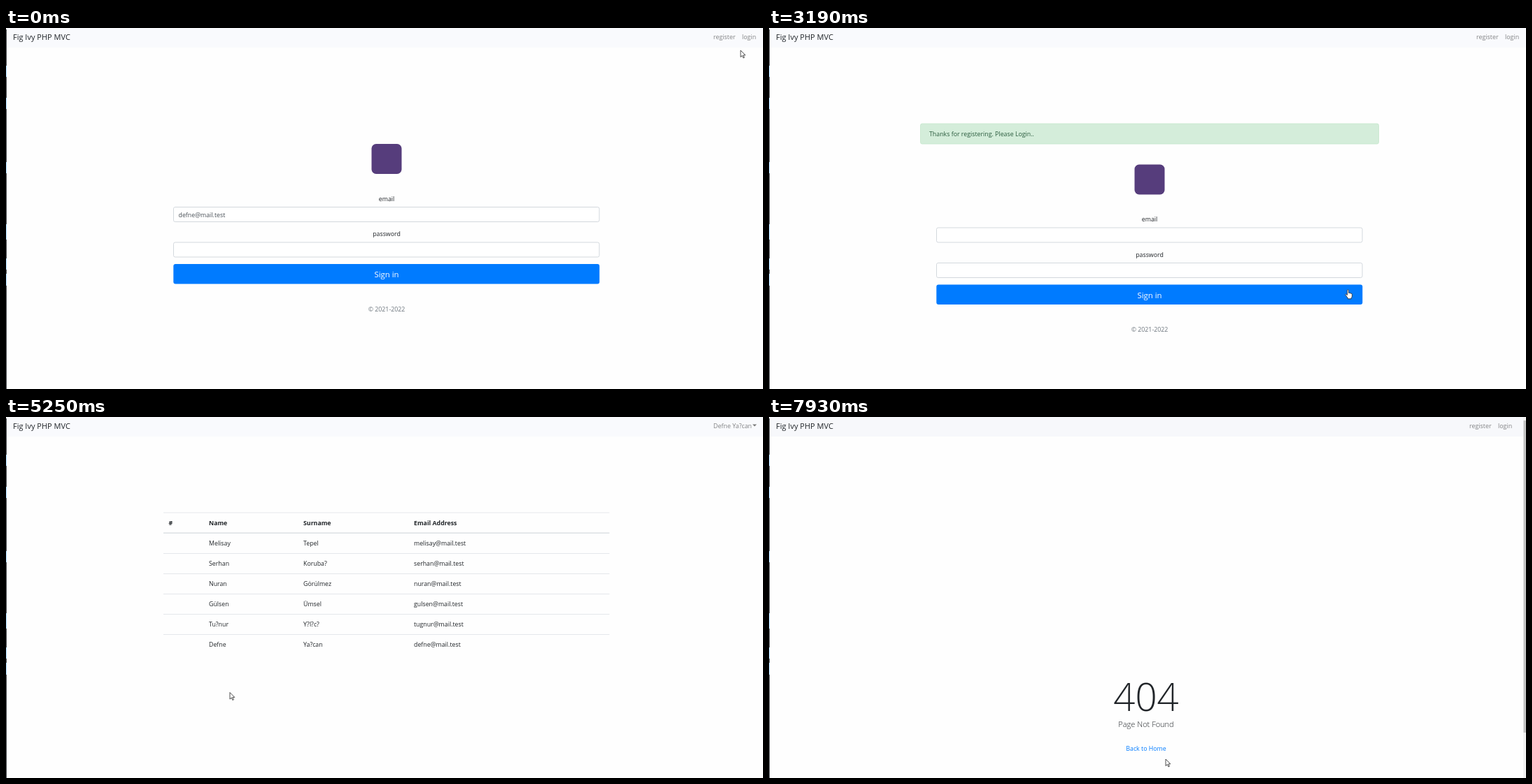
An HTML page for the animation above (8 s loop, 1082x517 px).

```html
<!DOCTYPE html>
<html lang="en">
<head>
<meta charset="utf-8">
<title>Registration walkthrough</title>
<style>
  html, body { margin: 0; width: 100%; height: 100%; overflow: hidden; background: #fefefe; }
  svg { display: block; width: 1082px; height: 517px; font-family: "Open Sans", "Noto Sans", sans-serif; }
</style>
</head>
<body>
<svg id="stage" viewBox="0 0 1082 517"></svg>
<script>
const LOOP = 8000;
const stage = document.getElementById('stage');
const INK = '#212529', FIELD_INK = '#495057', BLUE = '#007bff', BLUE_HOVER = '#0069d9';
const FIRST = 'Defne', LAST = 'Yağcan', EMAIL = 'defne@mail.test';

const PEOPLE = [
  ['Melisay', 'Tepel', 'melisay'],
  ['Serhan', 'Koruba?', 'serhan'],
  ['Nuran', 'Görülmez', 'nuran'],
  ['Gülsen', 'Ümsel', 'gulsen'],
  ['Tu?nur', 'Y?l?c?', 'tugnur'],
  [FIRST, 'Ya?can', 'defne']
];

// Pointer path: time, x, y and shape from that time on
const PATH = [
  [0, 1050, 32, 'arrow'], [80, 1050, 32, 'arrow'], [320, 1027, 11, 'hand'],
  [560, 1027, 11, 'arrow'], [860, 266, 181, 'beam'], [940, 261, 183, 'beam'],
  [2060, 261, 183, 'beam'], [2140, 330, 220, 'arrow'], [2305, 634, 367, 'arrow'],
  [2380, 634, 367, 'arrow'], [2550, 830, 373, 'hand'], [2870, 830, 373, 'hand'],
  [3420, 826, 376, 'arrow'], [3560, 690, 434, 'arrow'], [3740, 310, 298, 'beam'],
  [3880, 310, 298, 'arrow'], [3960, 301, 313, 'arrow'], [4050, 301, 313, 'arrow'],
  [4180, 300, 319, 'arrow'], [4300, 300, 319, 'arrow'], [4480, 312, 347, 'beam'],
  [4720, 312, 347, 'beam'], [4950, 320, 394.5, 'hand'], [5180, 320, 394.5, 'arrow'],
  [5330, 320, 394.5, 'arrow'], [5720, 1036, 12, 'hand'], [6030, 1036, 12, 'hand'],
  [6500, 1037, 42, 'hand'], [6740, 1037, 42, 'arrow'], [7400, 480, -16, 'arrow'],
  [7720, 535, -16, 'arrow'], [7850, 553, 362, 'arrow'], [7925, 567, 490, 'arrow']
];

const rect = (x, y, w, h, fill, extra = '') =>
  `<rect x="${x}" y="${y}" width="${w}" height="${h}" fill="${fill}" ${extra}/>`;

const text = (x, y, value, { size = 8.8, fill = INK, anchor = 'start', weight = 400 } = {}) =>
  `<text x="${x}" y="${y}" font-size="${size}" fill="${fill}" text-anchor="${anchor}" font-weight="${weight}">${value}</text>`;

const typed = (value, t, start, end) =>
  value.slice(0, Math.max(0, Math.floor((t - start) / (end - start) * value.length)));

function input(x, y, w, value = '', focused = false) {
  const ring = focused
    ? rect(x - .8, y - .8, w + 1.6, 23.6, 'none', 'rx="3" stroke="#bfdeff" stroke-width="2.4"') : '';
  const box = rect(x + .5, y + .5, w - 1, 21, '#fff',
    `rx="2.3" stroke="${focused ? '#80bdff' : '#ced4da'}" stroke-width=".9"`);
  const content = value === '•'
    ? `<circle cx="${x + 9.5}" cy="${y + 12}" r="1.2" fill="${FIELD_INK}"/>`
    : text(x + 7.5, y + 15, value, { fill: FIELD_INK });
  return ring + box + content;
}

function suggestions(x, y, h, items) {
  return rect(x - .5, y + 1, 114.5, h + .5, '#000', 'opacity=".16" rx="1.5"') +
    rect(x, y, 113, h, '#fff', 'rx="1" stroke="#d5d5d5" stroke-width=".6"') +
    items.map((item, i) => text(x + 7.3, y + 17.7 + i * 21.2, item, { size: 7.3, weight: 500 })).join('');
}

function leftEdge() {
  const lit = [[54, 70], [100, 116], [192, 208], [281, 303], [330, 346], [352, 369]];
  return rect(0, 2, 1, 515, '#45474b') +
    lit.map(([a, b]) => rect(0, a, 1, b - a, '#a9d8fb')).join('');
}

function navbar(t, { user = false, shift = 0, fill = '#f9fafd' } = {}) {
  const link = (x, label, hover) =>
    text(x - shift, 15.5, label, { size: 8.9, fill: hover ? '#4d4d4e' : '#828385' });
  const links = user
    ? link(1011, FIRST + ' Ya?can', t > 5720 && t < 6200) + '<path d="M1067 10.5h6l-3 3z" fill="#777"/>'
    : link(1011, 'register', t > 320 && t < 600) + link(1052, 'login');
  return rect(0, 0, 1082, 28, fill) + text(10, 16.5, 'Fig Ivy PHP MVC', { size: 11 }) + links;
}

function loginPage(dy, { email = '', password = '', focus = '', hover = false } = {}) {
  const middle = { anchor: 'middle' };
  return `<g transform="translate(0 ${dy})">` +
    rect(522.5, 166, 43, 43, '#563d7c', 'rx="6.5"') +
    text(544, 247.5, 'email', middle) + input(239, 256, 609.5, email, focus === 'email') +
    text(544, 298, 'password', middle) + input(239, 306.5, 609.5, password, focus === 'password') +
    rect(239.3, 338, 609, 28.5, hover ? BLUE_HOVER : BLUE, 'rx="3"') +
    text(544, 357, 'Sign in', { ...middle, size: 11.4, fill: '#fff' }) +
    text(544, 405.5, '© 2021-2022', { ...middle, fill: '#6c757d' }) + '</g>';
}

function registerPage(t) {
  const focus = t < 940 ? '' : t < 1340 ? 'first' : t < 1740 ? 'last'
    : t < 2060 ? 'email' : t < 2180 ? 'password' : 'confirm';
  const hover = t > 2540;
  const field = (name, label, x, y, w, value) =>
    text(x, y - 8.7, label) + input(x - .5, y, w, value, focus === name);
  return field('first', 'First Name', 231, 170, 310.5, typed(FIRST, t, 1010, 1310)) +
    field('last', 'Last Name', 547, 170, 310.5, typed(LAST, t, 1360, 1700)) +
    field('email', 'Email Address', 231, 230.3, 626.5, typed(EMAIL, t, 1750, 2040)) +
    field('password', 'Password', 231, 281, 626.5, t > 2120 ? '•' : '') +
    field('confirm', 'Confirm Password', 231, 331.7, 626.5, t > 2250 ? '•' : '') +
    rect(808, 363.3, 49.3, 22.4, hover ? BLUE_HOVER : BLUE, 'rx="2.4"') +
    text(832.6, 377.8, 'Register', { anchor: 'middle', fill: '#fff' }) +
    (t >= 940 && t < 1070 ? suggestions(231, 194, 94, ['Serhan', 'Nuran', 'Gülsen', 'Tuğnur']) : '');
}

function welcomeLogin(t) {
  const email = t < 4260 ? typed(EMAIL.slice(0, 4), t, 3760, 3950) : EMAIL;
  const focus = t < 3740 ? '' : t < 4490 ? 'email' : 'password';
  return rect(216.5, 137, 655, 29, '#d4edda', 'rx="2.4" stroke="#c3e6cb" stroke-width=".8"') +
    text(229, 155, 'Thanks for registering. Please Login..', { fill: '#285a3c' }) +
    loginPage(29.5, { email, password: t > 4620 ? '•' : '', focus, hover: t > 4930 }) +
    (t > 3800 && t < 4260 ? suggestions(239.5, 309.5, 30.5, [EMAIL]) : '');
}

function peopleTable() {
  const columns = [290, 425, 583];
  const row = (cells, y, weight) =>
    cells.map((cell, i) => text(columns[i], y, cell, { weight })).join('');
  let out = rect(225, 136.6, 637.5, .8, '#dee2e6') + rect(225, 165.5, 637.5, 1.2, '#d5dade') +
    text(232.5, 155, '#', { weight: 700 }) + row(['Name', 'Surname', 'Email Address'], 155, 700);
  PEOPLE.forEach(([name, surname, box], i) => {
    if (i) out += rect(225, 166 + i * 29, 637.5, .8, '#dee2e6');
    out += row([name, surname, box + '@mail.test'], 184.3 + i * 28.9, 400);
  });
  return out;
}

function logoutMenu(t) {
  return rect(1006.5, 26.5, 94, 29, '#fff', 'rx="2.4" stroke="#d0d0d0" stroke-width=".7"') +
    (t > 6300 ? rect(1007, 31.5, 94, 19, '#f1f3f5') : '') + text(1020.5, 44.2, 'Logout');
}

function addressList() {
  return rect(60, -2, 766, 97, '#000', 'opacity=".1" rx="3"') +
    rect(62, -2, 762, 95, '#fff', 'rx="2"') + rect(62, 28, 762, 20, '#eceef0') +
    ['login', 'register', 'home'].map((page, i) =>
      text(84, 41 + i * 20, 'localhost/' + page, { size: 8, fill: '#444' })).join('');
}

function missingPage() {
  const middle = { anchor: 'middle' };
  return text(539, 421, '404', { ...middle, size: 54.5, weight: 300 }) +
    text(539, 444.3, 'Page Not Found', { ...middle, size: 11, weight: 300 }) +
    text(539, 477.6, 'Back to Home', { ...middle, fill: BLUE }) +
    rect(1078, 0, 4, 517, '#f1f1f1') + rect(1078.5, 5, 3.5, 447, '#c1c1c1');
}

const SHAPES = {
  arrow: '<path d="M0 0v9.6l2.3-2.1 1.6 3.5 1.5-.7-1.6-3.4h3z" fill="#fff" stroke="#222" stroke-width=".8"/>',
  beam: '<path d="M-2.3-4.5h1.7l.6.6.6-.6h1.7M0-4v8M-2.3 4.5h1.7l.6-.6.6.6h1.7" fill="none" stroke="#222" stroke-width=".9"/>',
  hand: '<path d="M0 0q1 0 1 1v3.6q1-.5 1.7.2 1-.3 1.6.5 1.5-.2 1.6 1.2v2.6q0 1.5-1.2 2.6v1.3h-5v-1.3l-3.2-4.2q-.5-1 .5-1.3l2 1.4v-6.600q0-1 1-1z" fill="#fff" stroke="#222" stroke-width=".8"/>'
};

function pointer(t) {
  let i = PATH.length - 1;
  while (PATH[i][0] > t) i--;
  const [t0, x0, y0, shape] = PATH[i];
  const [t1, x1, y1] = PATH[i + 1] || [LOOP, x0, y0];
  const p = (t - t0) / (t1 - t0), k = p * p * (3 - 2 * p);
  return `<g transform="translate(${x0 + (x1 - x0) * k} ${y0 + (y1 - y0) * k})">${SHAPES[shape]}</g>`;
}

function scene(t) {
  if (t < 520) return navbar(t) + loginPage(0, { email: EMAIL });
  if (t < 2870) return navbar(t) + registerPage(t);
  if (t < 5180) return navbar(t) + welcomeLogin(t);
  if (t < 6660) return navbar(t, { user: true }) + peopleTable() + (t > 5790 ? logoutMenu(t) : '');
  if (t < 7770) return navbar(t) + loginPage(0) + (t > 7560 ? addressList() : '');
  return navbar(t, { shift: 10, fill: '#f7f8fb' }) + missingPage();
}

function draw(t) {
  stage.innerHTML = rect(0, 0, 1082, 517, '#fefefe') + scene(t) + leftEdge() + pointer(t);
}

const start = performance.now();
function tick() {
  draw((performance.now() - start) % LOOP);
  requestAnimationFrame(tick);
}
tick();
</script>
</body>
</html>
```
